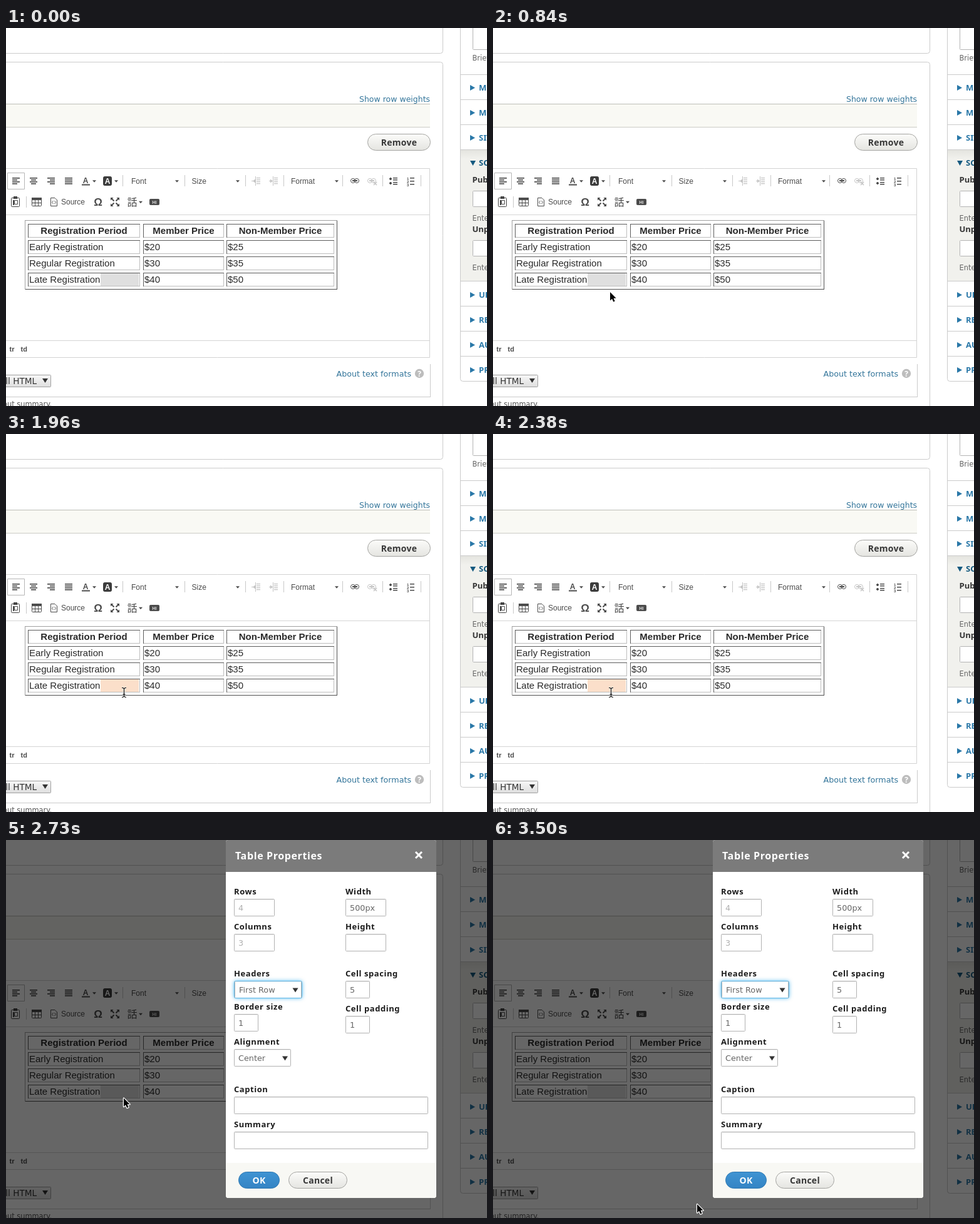
Recreate the animation shown at these times as an HTML page with a canvas. Size 768 by 604 pixels, loop 3.57 s.

```html
<!DOCTYPE html>
<html lang="en">
<head>
<meta charset="utf-8">
<title>Table properties dialog</title>
<style>
html, body { margin: 0; width: 100%; height: 100%; overflow: hidden; background: #fff; }
canvas { display: block; }
</style>
</head>
<body>
<canvas id="stage" width="768" height="604"></canvas>
<script>
const ctx = document.getElementById('stage').getContext('2d');
const LOOP = 3570, STEP = 70;
const UI = '"DejaVu Sans", "Noto Sans", sans-serif';
const UI_BOLD = '"Noto Sans", "Open Sans", sans-serif';
const ARIAL = '"Liberation Sans", Arial, sans-serif';
const INK = '#4c4c4c', PALE = '#c4c4c4', LINE = '#cbcbcb', LINK = '#33759a';

function text(str, x, y, font, color, align = 'left', spacing = 0) {
  ctx.font = font;
  ctx.fillStyle = color;
  ctx.textAlign = align;
  ctx.letterSpacing = spacing + 'px';
  ctx.fillText(str, x, y);
}
function fill(x, y, w, h, color) {
  ctx.fillStyle = color;
  ctx.fillRect(x, y, w, h);
}
function poly(points, color) {
  ctx.beginPath();
  points.forEach(([x, y]) => ctx.lineTo(x, y));
  ctx.closePath();
  ctx.fillStyle = color;
  ctx.fill();
}
function stroke(points, color, width = 1) {
  ctx.beginPath();
  points.forEach(([x, y], i) => i ? ctx.lineTo(x, y) : ctx.moveTo(x, y));
  ctx.strokeStyle = color;
  ctx.lineWidth = width;
  ctx.stroke();
}
function box(x, y, w, h, radius, face, edge) {
  ctx.beginPath();
  ctx.roundRect(x + .5, y + .5, w - 1, h - 1, radius);
  if (face) { ctx.fillStyle = face; ctx.fill(); }
  if (edge) { ctx.strokeStyle = edge; ctx.lineWidth = 1; ctx.stroke(); }
}
function shade(y, h, top, bottom) {
  const g = ctx.createLinearGradient(0, y, 0, y + h);
  g.addColorStop(0, top);
  g.addColorStop(1, bottom);
  return g;
}
const down = (x, y, w, h, color) =>
  poly([[x - w / 2, y - h / 2], [x + w / 2, y - h / 2], [x, y + h / 2]], color);

function pill(label, x, y, w, h, primary) {
  const face = primary ? shade(y, h, '#3f94d3', '#3484c4') : shade(y, h, '#fcfcfa', '#e4e4e0');
  box(x, y, w, h, h / 2, face, primary ? '#2e78b2' : '#a3a3a0');
  text(label, x + w / 2, y + h / 2 + 5, `bold 14px ${UI_BOLD}`, primary ? '#fff' : '#383838', 'center', .25);
}

function drawPanels() {
  box(-20, -20, 718, 61, 4, null, LINE);
  box(-20, 54, 718, 580, 4, null, LINE);
  text('Show row weights', 564, 118, `12.5px ${UI}`, LINK);
  fill(0, 121, 677, 38, '#f9f9f4');
  fill(0, 121, 677, 1, '#bdbeb8');
  fill(0, 158, 677, 1, '#cbccc5');
  pill('Remove', 577, 169, 101, 27);
  box(-20, 224, 697, 303, 0, null, '#d3d3d3');
  fill(0, 298, 676, 1, '#d5d5d5');
  fill(0, 499, 676, 1, '#d5d5d5');
  text('tr', 5.5, 517, `bold 11px ${ARIAL}`, INK, 'left', .2);
  text('td', 23.5, 517, `bold 11px ${ARIAL}`, INK, 'left', .2);
  fill(677, 537, 1, 53, LINE);
  fill(0, 589, 678, 1, LINE);
  box(-20, 554, 92, 20, 1, shade(554, 20, '#f8f8f8', '#dedede'), '#a0a0a0');
  text('Full HTML', 49, 568.5, `13.6px ${UI}`, '#333', 'right');
  down(62.5, 563.5, 9, 7, '#333');
  text('About text formats', 527.5, 556.5, `12.7px ${UI}`, LINK);
  ctx.beginPath();
  ctx.arc(660, 552, 7.2, 0, 7);
  ctx.fillStyle = '#bdbdbd';
  ctx.fill();
  text('?', 660, 556.5, `bold 12px ${UI_BOLD}`, '#fff', 'center');
  text('Leave blank to trim without summary.', 73, 605, `11.4px ${UI}`, '#555', 'right');
}

function bars(x, y, align, color = INK) {
  for (let i = 0; i < 4; i++) {
    const w = i % 2 && align !== 'full' ? 8 : 12;
    const shift = align === 'right' ? 12 - w : align === 'center' ? (12 - w) / 2 : 0;
    fill(x + shift, y + i * 3, w, 1.7, color);
  }
}
function indentIcon(x, dir) {
  for (let i = 0; i < 4; i++) fill(x + 1, 239 + i * 3, 6, 1.3, PALE);
  fill(x - 1, 237, 1, 15, PALE);
  poly([[x - 3 + dir * 2, 244.5], [x - 3 - dir * 2, 241.5], [x - 3 - dir * 2, 247.5]], PALE);
  fill(x - 7, 244, 4, 1, PALE);
}
function chain(x, color) {
  box(x - 7, 240, 8, 8, 3.5, null, color);
  box(x - 1, 240, 8, 8, 3.5, null, color);
  fill(x - 4, 243, 8, 2, color);
}
function drawToolbar() {
  box(2, 231, 28, 27, 0, '#fff', '#b5b5b5');
  ['left', 'center', 'right', 'full'].forEach((align, i) => bars(10 + 28 * i, 239, align));

  text('A', 127, 248, `bold 12px ${ARIAL}`, INK, 'center');
  fill(121, 249.5, 13, 2, INK);
  box(155, 237, 14, 15, 2, '#3c3c3c', '#3c3c3c');
  text('A', 162, 249, `bold 12px ${ARIAL}`, '#fff', 'center');
  for (const x of [141, 176, 273, 370, 528]) down(x, 245, 6, 3.5, INK);
  for (const x of [186, 285, 382, 443, 537, 601, 662]) fill(x, 235, 1, 18, '#c8c8c8');
  text('Font', 200, 248.5, `12px ${ARIAL}`, INK);
  text('Size', 296.5, 248.5, `12px ${ARIAL}`, INK);
  text('Format', 455, 248.5, `12px ${ARIAL}`, INK);
  indentIcon(399, -1);
  indentIcon(427, 1);
  chain(557, INK);
  chain(584, PALE);
  stroke([[587, 246], [592, 251]], PALE, 1.5);
  stroke([[592, 246], [587, 251]], PALE, 1.5);
  for (let i = 0; i < 2; i++) {
    box(612, 239 + i * 7, 4, 4, 2, INK, INK);
    fill(618, 239 + i * 7, 7, 1.5, INK);
    fill(618, 242 + i * 7, 7, 1.5, INK);
  }
  for (let i = 0; i < 3; i++) {
    text(i + 1, 640, 242.5 + i * 5, `bold 6px ${ARIAL}`, INK);
    fill(645, 239 + i * 5, 7, 1.5, INK);
  }

  box(8, 271, 14, 15, 1, '#fff', '#444');
  fill(12, 269, 6, 4, '#444');
  fill(11, 275, 2, 8, INK);
  box(13, 275, 6, 7, 0, null, INK);
  fill(32, 269, 1, 18, '#c8c8c8');
  box(41, 271, 16, 14, 1, null, INK);
  fill(41, 271, 16, 4, INK);
  fill(46, 275, 1, 10, INK);
  fill(51, 275, 1, 10, INK);
  fill(41, 279, 16, 1, INK);
  stroke([[78, 271.5], [71.5, 271.5], [71.5, 284.5], [81.5, 284.5], [81.5, 275], [78, 271.5]], INK);
  stroke([[75.5, 276], [73.5, 278.5], [75.5, 281]], INK);
  stroke([[77.5, 276], [79.5, 278.5], [77.5, 281]], INK);
  text('Source', 88, 281.5, `12px ${ARIAL}`, INK);
  text('Ω', 147, 284, `bold 17px ${ARIAL}`, INK, 'center');
  for (const sx of [-1, 1]) for (const sy of [-1, 1]) {
    const at = (a, b) => [174 + sx * a, 278 + sy * b];
    poly([at(7, 7), at(2.5, 7), at(7, 2.5)], INK);
    stroke([at(1.5, 1.5), at(5.5, 5.5)], INK, 2);
  }
  text('話', 201.5, 283.5, '16px "Noto Sans CJK JP", "Noto Sans CJK SC", sans-serif', INK, 'center');
  down(215, 278.5, 6, 3.5, INK);
  box(229, 273, 16, 10, 1, INK, INK);
  text('Hi', 237, 280.5, `bold 7px ${ARIAL}`, '#ddd', 'center');
}

function bevel(x, y, w, h, topLeft, bottomRight) {
  fill(x, y + h - 1, w, 1, bottomRight);
  fill(x + w - 1, y, 1, h, bottomRight);
  fill(x, y, w, 1, topLeft);
  fill(x, y, 1, h, topLeft);
}
function drawTable(selection) {
  const columns = [[35, 179], [219, 129], [352, 172]];
  const rows = [
    ['Registration Period', 'Member Price', 'Non-Member Price'],
    ['Early Registration', '$20', '$25'],
    ['Regular Registration', '$30', '$35'],
    ['Late Registration', '$40', '$50']
  ];
  bevel(30, 307, 499, 111, '#a0a0a0', '#505050');
  fill(151, 392, 61, 20, selection);
  rows.forEach((row, r) => row.forEach((value, c) => {
    const [x, w] = columns[c], y = 313 + 26 * r;
    bevel(x, y, w, 22, '#5c5c5c', '#bdbdbd');
    if (r) text(value, x + 2, y + 16, `15px ${ARIAL}`, '#2a2a2a');
    else text(value, x + w / 2, y + 16, `bold 15px ${ARIAL}`, '#2a2a2a', 'center');
  }));
}

function drawSidebar() {
  box(725, -20, 80, 585, 4, '#fff', LINE);
  fill(726, 195, 42, 210, shade(195, 14, '#e4e4df', '#f1f1ed'));
  for (const y of [74, 114, 154, 194, 404, 444, 484, 524]) fill(726, y, 42, 1, LINE);
  const sections = [['MENU', 95], ['META', 135], ['SITE', 175], ['URL', 426],
    ['REVISION', 466], ['AUTHOR', 506], ['PROMOTE', 546]];
  for (const [name, y] of sections) {
    poly([[741, y - 4], [749, y + .5], [741, y + 5]], '#2a78a8');
    text(name, 755, y + 5, `bold 13px ${UI_BOLD}`, '#2a78a8');
  }
  down(745.5, 216, 9, 8, '#155a80');
  text('SCHEDULE', 755, 220, `bold 13px ${UI_BOLD}`, '#155a80');
  box(745, -20, 60, 55, 1, '#fff', '#b4b4b4');
  text('Briefly', 744.5, 51.5, `11.4px ${UI}`, '#666');
  [['Publish', 247], ['Unpublish', 326]].forEach(([name, y]) => {
    text(name, 744.5, y, `bold 13px ${UI_BOLD}`, '#333');
    box(745, y + 13, 60, 26, 1, '#fff', '#b4b4b4');
    text('Enter', 744.5, y + 61, `11.4px ${UI}`, '#666');
  });
}

function label(name, x, y) {
  text(name, x, y, `bold 13px ${UI_BOLD}`, '#1c1c1c', 'left', .55);
}
function field(value, x, y, w, color = '#666') {
  box(x, y, w, 28, 1, '#fff', '#b2b2b2');
  fill(x + 1, y + 1, w - 2, 1, '#ececec');
  text(value, x + 7, y + 19, `12.8px ${UI}`, color);
}
function drawDialog(focus) {
  const shift = focus > 0 ? 1 : 0, right = 541 + shift;
  fill(0, 0, 768, 604, 'rgba(0,0,0,.6)');
  ctx.save();
  ctx.beginPath();
  ctx.roundRect(351, 0, 336, 572, 4);
  ctx.clip();
  fill(351, 0, 336, 572, '#fff');
  fill(351, 0, 336, 51, '#7b7b7b');
  fill(351, 516, 336, 56, '#f8f8f4');
  ctx.restore();
  text('Table Properties', 366, 31, `bold 16px ${UI_BOLD}`, '#fff', 'left', .62);
  stroke([[654, 19], [664, 29]], '#fff', 3);
  stroke([[664, 19], [654, 29]], '#fff', 3);

  [['Rows', '4', 87], ['Columns', '3', 143]].forEach(([name, value, y]) => {
    label(name, 364, y);
    field(value, 364, y + 7, 65, '#b0b0b0');
  });
  [['Width', '500px', 87, 65], ['Height', '', 143, 65],
   ['Cell spacing', '5', 218, 39], ['Cell padding', '1', 274, 39]].forEach(([name, value, y, w]) => {
    label(name, right, y);
    field(value, right, y + 7, w);
  });
  label('Headers', 364, 218);
  if (focus > 0) {
    ctx.save();
    ctx.shadowColor = `rgba(64,180,240,${focus})`;
    ctx.shadowBlur = 6;
    box(364, 225, 109, 28, 2, '#fff');
    ctx.restore();
  }
  field('First Row', 364 + shift, 225, 107);
  box(364, 225, 107 + 2 * shift, 28, 2, null, focus > 0 ? '#62b8e6' : '#8fa9c2');
  down(461 + shift, 240, 9, 7, '#333');
  label('Border size', 364, 271);
  field('1', 364, 278, 39);
  label('Alignment', 364, 327);
  field('Center', 364, 334, 91);
  down(445.5, 349, 9, 7, '#333');
  label('Caption', 364, 403);
  field('', 364, 410, 310);
  label('Summary', 364, 459);
  field('', 364, 466, 310);
  pill('OK', 371, 530, 66, 27, true);
  pill('Cancel', 451, 530, 94, 27);
}

function arrow(x, y) {
  const shape = [[0, 0], [0, 13.5], [3.1, 10.7], [5.2, 15.6], [7.6, 14.6], [5.5, 9.8], [9.6, 9.8]]
    .map(([a, b]) => [x + a + 1, y + b + 1]);
  ctx.lineJoin = 'round';
  stroke([...shape, shape[0], shape[1]], '#fff', 2.4);
  poly(shape, '#000');
}
function iBeam(x, y) {
  const trace = (color, width) => {
    stroke([[x, y - 6], [x, y + 6]], color, width);
    for (const s of [-1, 1]) {
      stroke([[x - 3.5, y + s * 7.5], [x - 1.5, y + s * 7.3], [x, y + s * 5.8],
        [x + 1.5, y + s * 7.3], [x + 3.5, y + s * 7.5]], color, width);
    }
    stroke([[x - 2, y + 3], [x + 2, y + 3]], color, width);
  };
  trace('rgba(255,255,255,.7)', 2.6);
  trace('#111', 1.2);
}

// time, x, y of the pointer's hot spot
const PATH = [
  [350, 183, 427], [560, 183, 427], [840, 186, 421], [910, 188.5, 414], [1050, 188.5, 411],
  [1470, 188.5, 411], [1610, 188.5, 413], [2380, 188.5, 413], [2450, 187, 411.5],
  [3290, 187, 411.5], [3360, 209, 440], [3430, 275, 528], [3500, 325, 581], [LOOP, 325, 581]
];
function pointerAt(t) {
  const i = PATH.findIndex(key => key[0] > t);
  const [t0, x0, y0] = PATH[i - 1], [t1, x1, y1] = PATH[i];
  const k = (t - t0) / (t1 - t0);
  return [x0 + (x1 - x0) * k, y0 + (y1 - y0) * k];
}

function draw(t) {
  fill(0, 0, 768, 604, '#fff');
  drawPanels();
  drawToolbar();
  drawTable(t >= 1960 && t < 2450 ? '#fbdfca' : '#dfdfdf');
  drawSidebar();
  if (t >= 2450) drawDialog(Math.min(1, (t - 2450) / 210));
  if (t >= PATH[0][0]) (t >= 910 && t < 2450 ? iBeam : arrow)(...pointerAt(t));
}
function tick() {
  const t = performance.now() % LOOP;
  draw(Math.floor(t / STEP) * STEP);
  requestAnimationFrame(tick);
}
tick();
</script>
</body>
</html>
```
